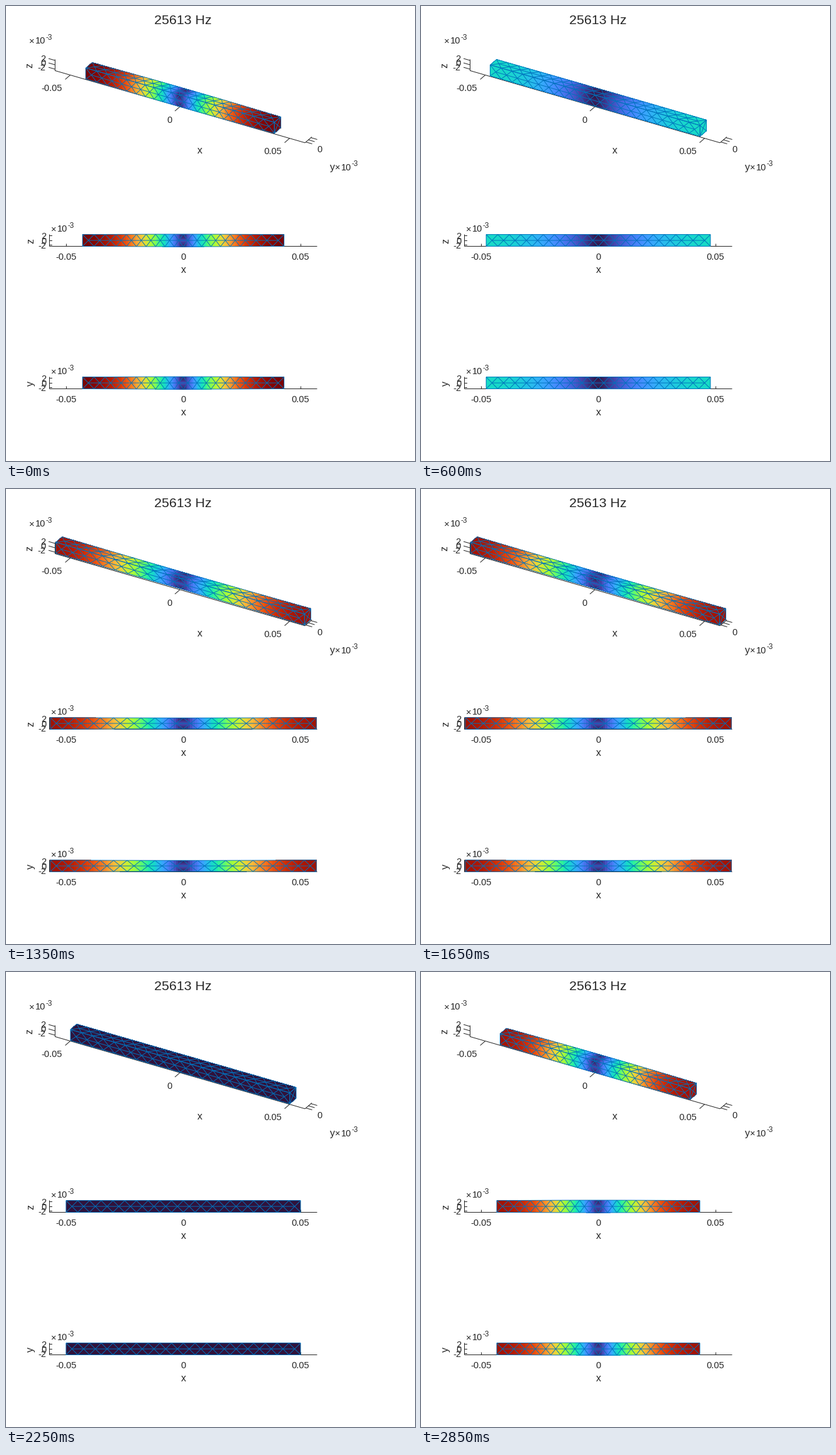
A matplotlib script for the animation above (3 s loop, 654 px wide and 728 px high).

```python
import numpy as np
import matplotlib.pyplot as plt
from matplotlib.animation import FuncAnimation
from matplotlib.collections import LineCollection, PolyCollection

W, H, DPI = 654, 728, 64
FRAMES, INTERVAL = 20, 150
PT = 72 / DPI

# bar geometry in mm
L, B = 50.0, 2.5
CELLS, COLS, ROWS = 20, 120, 8
AMP, POISSON = 7.04, 0.3
LIM_X, LIM_B = L + AMP, B * 1.066

CX = 283.5
VIEW_Y = (375.05, 603.08)
FLAT, ISO = 3.75, 4.05
S30, C30 = 0.5, np.sqrt(0.75)

INK = (0.15, 0.15, 0.15)
MESH = (0, 0.447, 0.741)
TURBO = plt.get_cmap("turbo")

plt.rcParams["font.family"] = "Liberation Sans"
fig = plt.figure(figsize=(W / DPI, H / DPI), dpi=DPI, facecolor="white")
ax = fig.add_axes([0, 0, 1, 1])
ax.set(xlim=(0, W), ylim=(H, 0))
ax.axis("off")


def iso(x, y, z):
    px = CX + ISO * (C30 * x + S30 * y)
    py = 147.05 + ISO * (S30 * S30 * x - C30 * S30 * y - C30 * z)
    return np.stack([px, py], axis=-1)


def flat(x, w, cy):
    return np.stack([CX + FLAT * x, cy - FLAT * w], axis=-1)


def pixel(v):
    """Centre of the pixel that holds v."""
    return np.floor(v) + 0.5


def label(x, y, s, size=14.67, ha="center", rot=0):
    ax.text(x, y, s, fontsize=size * PT, ha=ha, va="baseline", rotation=rot,
            rotation_mode="anchor", color=INK)


def line(p, q, snap=False):
    ax.plot([p[0], q[0]], [p[1], q[1]], color=INK, lw=PT, zorder=1,
            solid_capstyle="butt", snap=snap)


def exponent(x, y):
    label(x + 5, y, "×")
    label(x + 11, y, "10", ha="left")
    label(x + 27.7, y - 6.5, "-3", 11.7, "left")


def draw_iso_axes():
    corner = (-LIM_X, -LIM_B, -LIM_B)
    right = (LIM_X, -LIM_B, -LIM_B)
    line(iso(*corner), iso(*right))
    line(iso(*corner), iso(-LIM_X, -LIM_B, LIM_B), snap=True)
    line(iso(*right), iso(LIM_X, LIM_B, -LIM_B))
    for x in (-L, 0, L):
        p = iso(x, -LIM_B, -LIM_B)
        line(p, p + (-8, 7))
    for t in (-2, 0, 2):
        p = iso(-LIM_X, -LIM_B, t)
        line(p, p - (10, 2.9))
        p = iso(LIM_X, t, -LIM_B)
        line(p, p + (10, 2.9))
    label(73, 136, "-0.05")
    label(262, 187, "0")
    label(426.7, 237, "0.05")
    label(502, 234, "0")
    for s, y in (("2", 89), ("0", 96), ("-2", 103)):
        label(63.5, y, s, ha="right")
    label(310, 236.5, "x", 16)
    label(522, 263, "y", 16)
    label(42, 95, "z", 16, rot=90)
    exponent(36, 60.5)
    exponent(525, 263)


def draw_flat_axes(cy, name):
    base = pixel(cy + 9.45)
    left, end = 69.5, 497.5
    line((left, base), (end, base))
    line((left, base), (left, base - 19))
    for x, s in ((-L, "-0.05"), (0, "0"), (L, "0.05")):
        px = CX + FLAT * x
        line((pixel(px), base), (pixel(px), base - 4))
        label(px - 0.2, cy + 31, s)
    for t in (2, 0, -2):
        py = pixel(cy - FLAT * t)
        line((left, py), (left + 4.5, py))
        label(64.5, py + 5.3, str(t), ha="right")
    label(CX + 0.5, cy + 52.3, "x", 16)
    label(44, cy + 0.8, name, 16, rot=90)
    exponent(71, cy - 13.7)


def face_mesh():
    """Edges of one long face as (segment, end, (x, w))."""
    d = 2 * L / CELLS
    segs = [((-L, -B), (-L, B)), ((L, -B), (L, B))]
    for k in range(CELLS):
        a, b = -L + k * d, -L + (k + 1) * d
        mid = ((a + b) / 2, 0)
        for w in (-B, B):
            segs += [((a, w), (b, w)), ((a, w), mid), (mid, (b, w))]
        if k < CELLS - 1:
            segs.append((mid, (mid[0] + d, 0)))
    return np.array(segs)


def face_quads():
    """Small patches of one long face as (patch, corner, (x, w))."""
    xs = np.linspace(-L, L, COLS + 1)
    ws = np.linspace(-B, B, ROWS + 1)
    x0, w0 = (g.ravel() for g in np.meshgrid(xs[:-1], ws[:-1]))
    x1, w1 = x0 + 2 * L / COLS, w0 + 2 * B / ROWS
    x = np.stack([x0, x1, x1, x0], axis=1)
    w = np.stack([w0, w0, w1, w1], axis=1)
    return np.stack([x, w], axis=-1)


def magnitude(quads):
    """Relative displacement, linear inside the triangles around x = 0."""
    x, w = np.abs(quads.mean(axis=1)).T
    q = np.pi * np.maximum(x, B - w) / (2 * L)
    lateral = POISSON * np.pi * B / (2 * L)
    return np.minimum(np.hypot(np.sin(q), lateral * np.cos(q)), 1)


def deform(x, y, z, a):
    """First longitudinal mode with lateral contraction."""
    q = np.pi * x / (2 * L)
    side = 1 - POISSON * a * np.pi / (2 * L) * np.cos(q)
    return x + a * np.sin(q), y * side, z * side


EDGES, QUADS = face_mesh(), face_quads()
RING = np.array([(-B, -B), (B, -B), (B, B), (-B, B)])
END_SEGS = np.array([(p, q) for i, p in enumerate(RING)
                     for q in (RING[(i + 1) % 4], (0, 0))])
MODE = magnitude(QUADS)


def iso_side(pts, a):
    x, w = pts[..., 0], pts[..., 1]
    return iso(*deform(x, np.full_like(x, -B), w, a))


def iso_top(pts, a):
    x, w = pts[..., 0], pts[..., 1]
    return iso(*deform(x, w, np.full_like(x, B), a))


def iso_end(pts, a):
    y, z = pts[..., 0], pts[..., 1]
    return iso(*deform(np.full_like(y, L), y, z, a))


def flat_view(cy):
    def place(pts, a):
        x, w, _ = deform(pts[..., 0], pts[..., 1], 0, a)
        return flat(x, w, cy)
    return place


PARTS = [(iso_side, QUADS, EDGES, MODE),
         (iso_top, QUADS, EDGES, MODE),
         (iso_end, RING[None], END_SEGS, np.ones(1))]
PARTS += [(flat_view(cy), QUADS, EDGES, MODE) for cy in VIEW_Y]

fills, wires = [], []
for _ in PARTS:
    fill = PolyCollection([], edgecolors="none", antialiaseds=False,
                          snap=False, zorder=2)
    wire = LineCollection([], colors=[MESH], linewidths=0.95 * PT,
                          snap=False, zorder=3)
    fills.append(ax.add_collection(fill, autolim=False))
    wires.append(ax.add_collection(wire, autolim=False))

label(283, 29, "25613 Hz", 21.33)
draw_iso_axes()
for center, axis_name in zip(VIEW_Y, "zy"):
    draw_flat_axes(center, axis_name)


def update(i):
    phase = np.cos(2 * np.pi * i / FRAMES)
    a = -AMP * phase
    for (place, quads, edges, mode), fill, wire in zip(PARTS, fills, wires):
        fill.set_verts(place(quads, a))
        fill.set_facecolor(TURBO(np.abs(phase) * mode))
        wire.set_segments(place(edges, a))
    return fills + wires


anim = FuncAnimation(fig, update, frames=FRAMES, interval=INTERVAL,
                     repeat=True, repeat_delay=0, blit=False)
plt.show()
```
